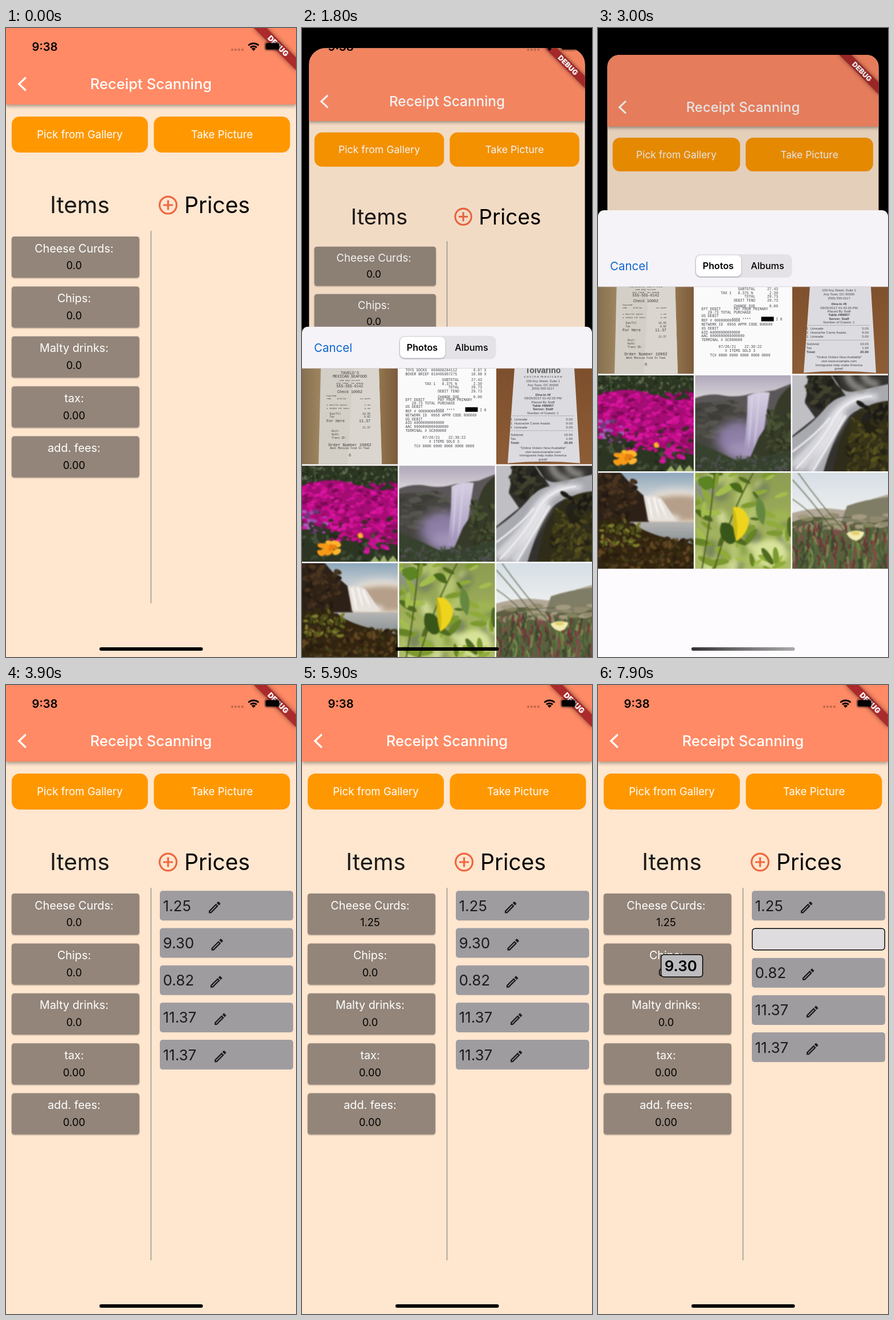
Recreate the animation shown at these times as an HTML page. Size 509x1101 px, loop 8000 ms.

```html
<!DOCTYPE html>
<html lang="en">
<head>
<meta charset="utf-8">
<title>Receipt Scanning</title>
<style>
  html, body { margin: 0; width: 100%; height: 100%; overflow: hidden; background: #000; }
  svg { display: block; width: 509px; height: 1101px; font-family: Inter, sans-serif; }
  .mono { font-family: "Liberation Mono", monospace; }
  .mono text { white-space: pre; }
  .sans { font-family: "Liberation Sans", sans-serif; }
  .card { filter: drop-shadow(0 1.5px 1.2px rgba(0, 0, 0, .35)); }
  .bar { filter: drop-shadow(0 3px 3px rgba(0, 0, 0, .35)); }
  .photo { filter: blur(.9px); }
  .soft { filter: blur(4px); }
  .mist { filter: blur(9px); }
</style>
</head>
<body>
<svg id="stage" viewBox="0 0 509 1101"></svg>
<script>
const W = 509, H = 1101, LOOP = 8000, STEP = 100;

// Markup helpers
const rect = (x, y, w, h, fill, more = '') =>
  `<rect x="${x}" y="${y}" width="${w}" height="${h}" fill="${fill}" ${more}/>`;
const oval = (x, y, rx, ry, fill, more = '') =>
  `<ellipse cx="${x}" cy="${y}" rx="${rx}" ry="${ry}" fill="${fill}" ${more}/>`;
const text = (x, y, size, str, fill = '#000', more = '') =>
  `<text x="${x}" y="${y}" font-size="${size}" fill="${fill}" ${more}>${str}</text>`;
const path = (d, fill, more = '') => `<path d="${d}" fill="${fill}" ${more}/>`;
const line = (d, color, width, more = '') =>
  path(d, 'none', `stroke="${color}" stroke-width="${width}" ${more}`);
const group = (body, more = '') => `<g ${more}>${body}</g>`;
const gradient = (id, stops, dir = 'x2="0" y2="1"') =>
  `<linearGradient id="${id}" ${dir}>` + stops.map(([at, c]) =>
    `<stop offset="${at}" stop-color="${c}"/>`).join('') + '</linearGradient>';
const MID = 'text-anchor="middle"', END = 'text-anchor="end"';
const SOFT = 'class="soft"', MIST = 'class="mist"';

function random(seed) {
  return () => {
    seed = seed + 0x6D2B79F5 | 0;
    let v = Math.imul(seed ^ seed >>> 15, 1 | seed);
    v = v + Math.imul(v ^ v >>> 7, 61 | v) ^ v;
    return ((v ^ v >>> 14) >>> 0) / 4294967296;
  };
}

// Scattered ellipses inside a box
function blobs(seed, n, [x, y, w, h], [rx, ry], colors, turn = 180) {
  const r = random(seed);
  let out = '';
  for (let i = 0; i < n; i++) {
    const cx = (x + r() * w).toFixed(1), cy = (y + r() * h).toFixed(1), k = .5 + r() * .7;
    out += oval(cx, cy, (rx * k).toFixed(1), (ry * k).toFixed(1), colors[r() * colors.length | 0],
      `transform="rotate(${(r() - .5) * turn | 0} ${cx} ${cy})"`);
  }
  return out;
}

// Strokes growing up from random points
function blades(seed, n, [x, y, w, h], len, lean, colors, width) {
  const r = random(seed);
  let out = '';
  for (let i = 0; i < n; i++) {
    const px = x + r() * w, py = y + h * i / n, l = len * (.6 + r() * .6);
    out += line(`M${px.toFixed(1)} ${py.toFixed(1)}q${(lean * r()).toFixed(1)} ${(-l / 2).toFixed(1)} ` +
      `${(lean * (r() - .3)).toFixed(1)} ${(-l).toFixed(1)}`,
      colors[r() * colors.length | 0], width, 'stroke-linecap="round"');
  }
  return out;
}

// Receipt rows: [y, size, left text, right text]; no right text means centred
const receipt = (rows, left, right, mid, color) => rows.map(([y, size, a, b]) =>
  b === undefined ? text(mid, y, size, a, color, MID)
    : text(left, y, size, a, color) + text(right, y, size, b, color, END)).join('');
const bold = str => `<tspan font-weight="700">${str}</tspan>`;
const base = fill => rect(-10, -10, 188, 188, fill);
const scene = body => group(body, 'class="photo"');

const photos = [
  () => rect(0, 0, 168, 168, 'url(#wood)') +
    path('M33 0H135L140 168H29Z', '#d3cec6') + path('M90 0H135L140 168H80Z', '#dad5ce') +
    group(receipt([
      [10, 6.7, "TAVELO'S"], [16.5, 6.7, 'MEXICAN SEAFOOD'], [22, 4.4, '100 Any Street'],
      [27, 4.4, 'Any Town, CA 00000'], [33, 6.5, '555-555-0142'], [43, 6.7, 'Check 10062'],
      [49, 4.2, 'FACTURE', ''], [54, 4.4, 'Tab    6/8/18', '12:42PM'],
      [65, 4.4, '1 Bottle Water', '1.25'], [71, 4.4, '2 Shake Fd Taco', '9.30'],
      [81, 4.6, '  Sub/Ttl', '10.55'], [86.5, 4.6, '  Tax', '0.82'],
      [94, 6.7, 'For Here', '11.37'], [105, 4.6, '', '11.37'], [111, 4.8, '   Acct:', ''],
      [117, 4.8, '   Auth:', ''], [123, 4.8, '   Trans ID:', ''],
      [136, 7, 'Order Number 10062'], [141.5, 4.6, 'Best Mexican Food In Town'], [154, 7, '6']
    ], 43, 120, 84, '#3c3a38'), 'class="mono"'),

  () => rect(0, 0, 168, 168, '#fbfafb') + group(receipt([
      [5, 6.3, 'TOYS SOCKS  060868284112', '6.97 X'], [12.5, 6.3, 'BOXER BRIEF 019495967275', '10.98 X'],
      [22, 6.3, '                 SUBTOTAL', '27.43  '], [29, 6.3, '         TAX 1   8.375 %', '2.30  '],
      [35, 6.3, '                    TOTAL', '29.73  '], [42, 6.3, '               DEBIT TEND', '29.73  '],
      [52, 6.3, '               CHANGE DUE', '0.00  '], [57, 6.3, 'EFT DEBIT      PAY FROM PRIMARY', ''],
      [63, 6.3, '   29.73 TOTAL PURCHASE', ''], [69, 6.3, 'US DEBIT', ''],
      [75, 6.3, '              **** ****', 'I 0'], [77, 6.3, 'REF # 000000000000', ''],
      [84, 6.3, 'NETWORK ID  0056 APPR CODE 000000', ''], [91, 6.3, 'US DEBIT', ''],
      [97.5, 6.3, 'AID A0000000000000', ''], [104, 6.3, 'AAC 0000000000000000', ''],
      [111, 6.3, 'TERMINAL # SC000000', ''], [123, 6.3, '        07/26/21    22:36:22', ''],
      [130, 6.3, '           # ITEMS SOLD 3', ''], [138, 6.3, '    TC# 0000 0000 0000 0000 0000', '']
    ], 11, 153, 84, '#454347'), 'class="mono"') +
    rect(116, 68, 22, 8, '#000'),

  () => rect(0, 0, 168, 168, 'url(#table)') +
    path('M32 0H137L147 166Q82 160 20 166Z', '#dcdbe0') +
    group(text(82, 8, 14, 'Tolvarino', '#555', MID + ' font-weight="700"') + receipt([
      [16, 6, 'c o c i n a &#160;m e x i c a n a'], [24, 5.8, '100 Any Street, Suite 1'],
      [31, 5.8, 'Any Town, DC 00000'], [37.5, 5.8, '(555) 555-0117'],
      [48, 5.6, bold('Dine-In #8')], [54.5, 6, '09/25/2017 01:42:20 PM'],
      [61, 6, 'Placed By Staff'], [67, 6, bold('Table #MW07')],
      [73.5, 6, bold('Server: Staff')], [80, 6, 'Number of Guests: 1'],
      [91, 6, '1&#160; Limeade', '5.00'], [98, 6, '1&#160; Huarache Carne Asada', '9.00'],
      [105, 6, '1&#160; Limeade', '5.00'], [118, 6, 'Subtotal', '19.00'], [125, 6, 'Tax', '1.90'],
      [132, 6, bold('Total:'), bold('20.90')],
      [141, 6, '"Online Orders Now Available"'], [148, 6, 'visit www.example.com'],
      [154.5, 6, 'Immigrants help make America'], [161, 6, 'great!']
    ], 25, 134, 82, '#444348') + line('M24 109H136M24 83H136', '#999', .6), 'class="sans"'),

  () => scene(base('#2b3522') +
    blobs(11, 150, [0, 0, 168, 34], [3, 1.5], ['#50613f', '#3a4a2e', '#6a7758', '#1c2714']) +
    path('M-5 38Q45 16 90 32T175 42V140Q90 125 -5 96Z', '#a30d74') +
    blobs(12, 260, [0, 30, 168, 78], [6, 3], ['#c60d8b', '#d816a0', '#a80b76', '#cf1297', '#7c0a56'], 50) +
    blobs(13, 70, [50, 92, 118, 40], [6, 3.4], ['#c60d8b', '#d818a0', '#3a2c28', '#8f0c60'], 50) +
    blobs(14, 34, [0, 80, 44, 38], [5, 3], ['#9a4bb0', '#6d3a78', '#3a3530', '#a85bb8'], 40) +
    blobs(15, 60, [0, 122, 168, 46], [5, 3], ['#212c1a', '#3a4830', '#2d3a22', '#46503a']) +
    blobs(18, 14, [110, 126, 40, 26], [6, 4], ['#c0128a', '#d218a0'], 40) +
    blobs(16, 14, [32, 134, 32, 20], [8, 5], ['#f79a16', '#ffb62e', '#e87f0c'], 90) +
    blobs(17, 4, [98, 121, 6, 5], [6, 4], ['#f79a16', '#ffb62e']) +
    path('M120 168L128 158 136 168 144 156 150 168 160 157 168 168V178H120Z', '#9db06a')),

  () => scene(base('url(#dusk)') +
    path('M-5 42Q22 30 48 35T98 32L140 26 175 12V178H-5Z', '#5b5657') +
    path('M-5 50Q40 42 72 56L96 70V150H-5Z', '#45443f') +
    blobs(21, 40, [0, 46, 84, 70], [12, 4], ['#4d4c45', '#3d3d38', '#55544c'], 40) +
    oval(80, 112, 44, 32, '#8d7ea6', MIST) +
    path('M92 36Q110 27 131 30L120 100 108 140H84Q92 90 92 36Z', 'url(#falls)') +
    line('M100 38Q98 80 93 130M112 34Q109 80 103 130', '#dcd6ea', 3, 'opacity=".6"') +
    oval(86, 132, 32, 14, '#a496bb', MIST) +
    path('M175 14Q150 28 142 52T112 108L94 150 175 178Z', '#363a28') +
    blobs(22, 70, [126, 62, 44, 100], [7, 3], ['#414a2d', '#2d3320', '#4a5434']) +
    path('M-5 114Q38 132 70 148L110 144 175 130V178H-5Z', '#37422e') +
    blobs(23, 110, [0, 142, 168, 28], [4, 2], ['#435040', '#2f3a28', '#4f5c46', '#544a56'])),

  () => scene(base('#34322e') +
    path('M-5 -5H32L22 48 40 74 -5 110Z', '#bfbfc4') +
    path('M30 -5H76Q92 24 84 50L60 66 34 56 24 26Z', '#2a2a22') +
    blobs(31, 40, [28, 0, 52, 56], [9, 5], ['#1e1e1a', '#38382a', '#43422e', '#292820']) +
    path('M66 -5Q82 34 110 28L175 14V58Q120 46 96 76T52 178H-5V112Q34 86 54 62T94 36Z', '#a9aab0') +
    line('M0 158Q48 112 66 78T132 32M12 164Q58 118 78 76T150 38M30 168Q68 112 92 68', '#e2e2e7', 9, SOFT) +
    line('M0 134Q46 100 66 74M6 164Q54 114 72 78T140 36M36 168Q72 108 94 70', '#f0f0f3', 3) +
    line('M96 -4Q100 20 128 26M124 -4Q128 14 152 16', '#8c8b88', 12, SOFT) +
    path('M175 44Q128 46 104 76T70 178H175Z', '#2f2c19') +
    blobs(32, 120, [98, 78, 72, 90], [8, 4], ['#4c461c', '#353218', '#5a531f', '#232114', '#403d18']) +
    blobs(33, 26, [118, 50, 52, 26], [9, 4], ['#23221c', '#38341f', '#1a1914'])),

  () => scene(base('url(#sky)') +
    oval(140, 48, 46, 16, '#f6ebdc', MIST) +
    path('M-5 -5H36Q58 22 80 40L90 88H-5Z', '#2c2017') +
    blobs(41, 80, [0, 4, 66, 74], [7, 4], ['#3d2b1b', '#241a12', '#4a3420', '#302315']) +
    path('M104 44Q140 36 175 42V84H90Z', '#b59f8a', SOFT) +
    path('M80 41Q98 38 112 46L138 84H88Z', '#e6e0da') +
    line('M88 44L96 82M98 43L108 82M106 46L122 82', '#f6f3f0', 4) +
    oval(118, 80, 26, 7, '#e8e2dc', SOFT) +
    path('M56 86H175V135H56Z', 'url(#lake)') +
    path('M-5 82L62 88Q84 110 175 126V178H-5Z', '#32240f') +
    blobs(43, 190, [0, 114, 168, 56], [5, 3], ['#513a1c', '#2a1d0f', '#634722', '#3f3a17', '#382a14']) +
    blobs(44, 80, [6, 82, 66, 46], [5, 2.5], ['#5f641f', '#474a19', '#7d7c2c', '#342a13'])),

  () => scene(base('url(#leaf)') +
    group(blobs(51, 46, [0, 0, 168, 168], [18, 12],
      ['#b4c470', '#8aa044', '#9fb552', '#79875a', '#cdd895']) +
      oval(132, 140, 30, 24, '#d7e29a') + oval(14, 30, 16, 22, '#8c9383'), SOFT) +
    blobs(52, 54, [0, 0, 168, 168], [16, 5], ['#7d9a30', '#8fac3a', '#668426', '#a4be4e', '#506b20']) +
    line('M34 0Q28 80 12 168M102 0Q62 70 34 168', '#4c5c22', 2.2) +
    path('M4 12Q36 -4 32 24 14 40 4 12Z', '#5b8422') + path('M60 20Q82 10 84 36 68 34 60 20Z', '#48691a') +
    path('M110 42Q130 56 120 92 100 74 110 42Z', '#658840') +
    path('M46 88Q66 84 70 106T58 124Q38 112 46 88Z', '#38551a') +
    path('M67 60Q88 58 95 84 92 108 72 120 64 92 67 60Z', '#eed41d') +
    path('M67 60Q78 88 72 120 64 92 67 60Z', '#cdb914')),

  () => scene(base('url(#haze)') +
    path('M-5 72Q40 58 80 64T140 46L175 36V110H-5Z', '#b3a897') +
    path('M96 58Q130 46 175 42V92H84Z', '#7f7d66') +
    path('M-5 88Q40 70 76 82T175 80V178H-5Z', '#5c6040') +
    blobs(61, 46, [0, 74, 168, 28], [12, 4], ['#a39a80', '#85835f', '#918a6e'], 20) +
    blades(62, 240, [0, 108, 168, 70], 20, 8,
      ['#5d7240', '#6f3638', '#465a34', '#7a8c50', '#84484a', '#40462e', '#52663a'], 3.4) +
    line('M0 12Q44 60 72 102M0 46Q40 72 66 112M10 0Q50 56 90 100M0 100Q40 78 104 78', '#4c5638', 1.3) +
    line('M111 114L118 150', '#6b7f3c', 4) +
    path('M95 106Q110 98 127 104 122 118 112 119 100 117 95 106Z', '#f2ecb4') +
    oval(111, 106, 8, 3, '#e3d067'))
];

const defs = `<defs>
  <clipPath id="frame"><rect id="mask" width="${W}" height="${H}"/></clipPath>
  <clipPath id="cell"><rect width="168" height="168"/></clipPath>
  <clipPath id="sheetClip"><path d="M0 13Q0 0 13 0H496Q509 0 509 13V${H}H0Z"/></clipPath>` +
  gradient('wood', [[0, '#86704f'], [.2, '#a08661'], [.8, '#94764f'], [1, '#7b5a3a']], '') +
  gradient('table', [[0, '#7e4f2c'], [1, '#8c5d36']]) +
  gradient('dusk', [[0, '#a59db2'], [.25, '#d5cfd6']]) +
  gradient('falls', [[0, '#d6cfe2'], [1, '#a396bd']]) +
  gradient('sky', [[0, '#7f9db6'], [.3, '#d3d6d6'], [.5, '#eeddc8']]) +
  gradient('lake', [[0, '#b5b5b3'], [1, '#7d868c']]) +
  gradient('leaf', [[0, '#8a9a50'], [1, '#b0c066']]) +
  gradient('haze', [[0, '#d3dce4'], [.45, '#eef0f0']]) +
  gradient('fade', [[0, '#333'], [.4, '#666'], [1, '#aaa']], '') + '</defs>';

// Main screen
const WHITE = '#fff';
const button = (x, label) => rect(x, 155, 239, 63, '#ff9800', 'rx="14"') +
  text(x + 119.5, 193, 18.6, label, WHITE, MID);

const items = [['Cheese Curds:', '0.0'], ['Chips:', '0.0'], ['Malty drinks:', '0.0'],
  ['tax:', '0.00'], ['add. fees:', '0.00']];
const itemCard = ([name, value], i) => {
  const y = 365 + i * 87.4;
  return rect(10, y, 224, 72, '#93857a', 'rx="4.5" class="card"') +
    text(119.5, y + 27.5, 19.8, name, WHITE, MID) +
    text(119.5, y + 57.3, 18.3, value, '#000', `${MID} id="value${i}"`);
};

const PENCIL = 'M14.06 9.02l.92.92L5.92 19H5v-.92l9.06-9.06M17.66 3c-.25 0-.51.1-.7.29l-1.83 1.83 3.75 3.75 ' +
  '1.83-1.83c.39-.39.39-1.02 0-1.41l-2.34-2.34c-.2-.2-.45-.29-.71-.29zm-3.6 3.19L3 17.25V21h3.75L17.81 9.94z';
const prices = [['1.25', 356], ['9.30', 360.5], ['0.82', 359], ['11.37', 366], ['11.37', 366]];
const ROW_X = 270, rowY = i => 360.3 + i * 65.2;
const priceRow = ([price, iconX], i) => group(
  group(rect(0, 0, 234, 52, '#9f9ca0', 'rx="5"') + text(5.5, 35.5, 26, price, '#1c1b1d') +
    path(PENCIL, '#1c1b1d', `transform="translate(${iconX - ROW_X - 3.4} 15.4) scale(1.13)"`), 'class="full"') +
  rect(.7, .7, 232.6, 37.6, '#dedcde', 'class="slot" rx="5" stroke="#000" stroke-width="1.4"'), `id="row${i}"`);

const banner = group(
  rect(-52.2, 36.5, 104.4, 15.7, '#ab2a2b', 'style="filter:drop-shadow(0 0 4px rgba(0,0,0,.5))"') +
  text(0, 49, 13.2, 'DEBUG', WHITE, `${MID} font-weight="900"`), 'transform="translate(509 0) rotate(45)"');

const app = group(group(
  rect(0, 0, W, H, '#fee6cf') +
  rect(0, 0, W, 134, '#ff8a65', 'class="bar"') +
  line('M34.8 86.5L22.8 98 34.8 109.5', WHITE, 3.3) +
  text(254.5, 107, 25.6, 'Receipt Scanning', WHITE, `${MID} font-weight="500"`) +
  button(10, 'Pick from Gallery') + button(259.5, 'Take Picture') +
  text(129.5, 324, 40.4, 'Items', '#1c1a18', MID) + text(313, 324, 39, 'Prices') +
  '<circle cx="284.5" cy="310" r="14.9" fill="none" stroke="#f0673f" stroke-width="3.2"/>' +
  line('M276 310H293M284.5 301.5V318.5', '#f0673f', 3.2) +
  rect(253.8, 355, 1.4, 652, '#969491') +
  items.map(itemCard).join('') +
  group(prices.map(priceRow).join(''), 'id="prices"') +
  group(rect(0, 0, 73, 39, '#bdbcbe', 'id="chip" rx="5" stroke="#000" stroke-width="1.5"') +
    text(6, 29, 26, '', '#000', 'id="chipText" font-weight="600"'), 'id="drag"') +
  banner + rect(0, 0, W, H, '#000', 'id="dim"'), 'clip-path="url(#frame)"'), 'id="app"');

// Photo picker
const grid = photos.map((draw, i) => group(draw(),
  `clip-path="url(#cell)" transform="translate(${i % 3 * 170.5} ${(i / 3 | 0) * 170.5})"`)).join('');
const sheet = group(group(
  rect(0, 0, W, H, '#fdfbfd') + group(grid, 'id="grid"') +
  rect(0, -80, W, 153, '#f5f3f7', 'id="head"') +
  group(rect(0, 36, W, .8, '#cfcdd2') +
    text(21, 7.5, 20.5, 'Cancel', '#0f66d0') +
    rect(170, -20.5, 170.5, 41, '#e4e2e7', 'rx="10"') +
    rect(172, -18.5, 79.5, 37, WHITE, 'rx="8" class="card"') +
    text(211, 6, 16.2, 'Photos', '#000', `${MID} font-weight="600"`) +
    text(297.5, 6, 16.2, 'Albums', '#000', `${MID} font-weight="500"`), 'id="tools"'),
  'clip-path="url(#sheetClip)"'), 'id="sheet"');

const status = text(45.5, 40, 20.2, '9:38', '#000', 'font-weight="600"') +
  [397, 403, 409, 415].map(x => `<circle cx="${x}" cy="38" r="2.1" fill="#000" opacity=".25"/>`).join('') +
  line('M425.5 30.5A13 13 0 0 1 443.5 30.5M429 34.2A8 8 0 0 1 440 34.2', '#000', 3) +
  path('M434.5 40L430.8 36.3A5.3 5.3 0 0 1 438.2 36.3Z', '#000') +
  rect(453.7, 24.7, 28, 15, 'none', 'rx="4.5" stroke="#000" stroke-opacity=".4" stroke-width="1.3"') +
  rect(455.3, 26.3, 24.8, 11.8, '#000', 'rx="3"');
const home = rect(164, 1084, 181.5, 6, '#000', 'id="home" rx="3"');

document.getElementById('stage').innerHTML = defs + rect(0, 0, W, H, '#000') + app + sheet + status + home;

const $ = id => document.getElementById(id);
const set = (id, name, value) => $(id).setAttribute(name, value);
const move = (id, x, y, scale = 1) => set(id, 'transform', `translate(${x} ${y}) scale(${scale})`);
const show = (node, on) => { node.style.display = on ? '' : 'none'; };

// Critically damped spring, 0 to 1
const spring = ms => {
  const x = Math.max(0, ms) * .0177;
  return 1 - (1 + x) * Math.exp(-x);
};

// Each drag: row, card position, lift and drop times, and [time, share of the way]
const drags = [
  { row: 0, to: [111, 385], from: 5000, end: 5900, way: [[5200, .15], [5300, .45], [5400, .8], [5500, 1]] },
  { row: 1, to: [110.7, 472], from: 7200, end: LOOP, way: [[7600, .15], [7700, .45], [7800, .8], [7900, 1]] }
];

function drawSheet(t) {
  const closing = t >= 3000;
  const p = t >= 3100 ? 0 : closing ? .7615 : spring(t - 1693.3);
  const back = p ** .95, scale = 1 - .083 * back;
  move('app', W * (1 - scale) / 2, 60.8 * back, scale);
  set('mask', 'rx', p ? (51 - 38 * back) / scale : 0);
  set('dim', 'opacity', .2 * p ** 2.5);
  const head = closing ? 134 : 73;
  show($('sheet'), p > 0);
  move('sheet', 0, H - p * (H - 74));
  move('grid', 0, closing ? 118.5 : 73);
  set('head', 'height', head + 80);
  move('tools', 0, head - 36.5);
  set('home', 'fill', closing && p ? 'url(#fade)' : '#000');
}

function drawPrices(t) {
  const drag = drags.find(d => t >= d.from && t < d.end);
  show($('prices'), t >= 3900);
  prices.forEach((_, i) => {
    const lifted = !!drag && i === drag.row, row = $('row' + i);
    move('row' + i, ROW_X, rowY(i) - (drag && i > drag.row ? 13 : 0));
    show(row.querySelector('.full'), !lifted);
    show(row.querySelector('.slot'), lifted);
  });
  show($('drag'), !!drag);
  if (drag) {
    const k = drag.way.reduce((last, [at, share]) => t >= at ? share : last, 0);
    const y = rowY(drag.row);
    move('drag', ROW_X + (drag.to[0] - ROW_X) * k, y + (drag.to[1] - y) * k);
    $('chipText').textContent = prices[drag.row][0];
    set('chip', 'width', drag.row ? 73 : 69);
  }
  $('value0').textContent = t >= 5900 ? '1.25' : '0.0';
}

const start = performance.now();
let shown = -1;
function tick() {
  const t = Math.floor((performance.now() - start) % LOOP / STEP) * STEP;
  if (t !== shown) {
    shown = t;
    drawSheet(t);
    drawPrices(t);
  }
  requestAnimationFrame(tick);
}
tick();
</script>
</body>
</html>
```
